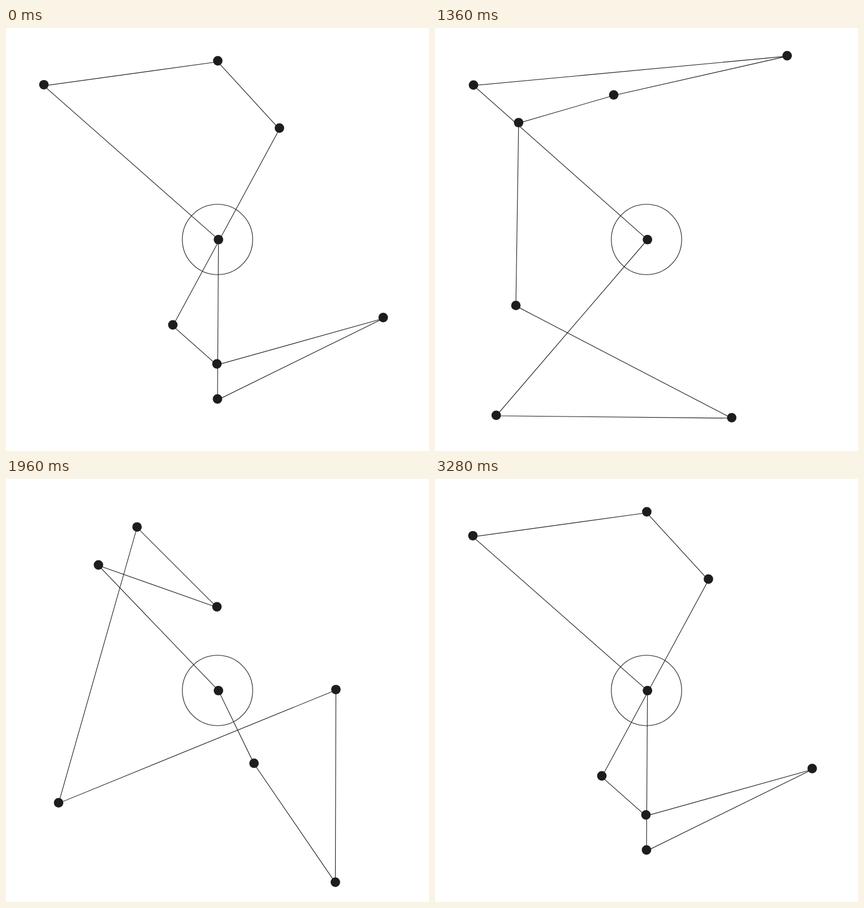
Animation, 748 px wide and 748 px high, one loop 3920 ms. Source, as an HTML page:

```html
<!DOCTYPE html>
<html lang="en">
<head>
<meta charset="utf-8">
<title>Linked nodes</title>
<style>
  html, body { margin: 0; width: 100%; height: 100%; overflow: hidden; background: #fff; }
  svg { display: block; width: 100%; height: 100%; }
  .wire { fill: none; stroke: #1c1c1c; stroke-width: 1.1; }
  .dot { fill: #1d1d1d; }
</style>
</head>
<body>
<svg viewBox="0 0 748 748">
  <circle class="wire" cx="374" cy="374" r="62.2"/>
  <polygon class="wire" id="path"/>
  <g id="dots"></g>
</svg>
<script>
  const TICK = 40, MOVE = 640, CYCLE = 1320, LOOP = 3920;
  const HUB = [375.7, 374.2];

  // The chain of nodes in its three resting poses; `drop` sets the wire below the dots.
  const POSES = [
    { drop: 1.8, nodes: '67,100.3 374.5,58 483.5,177 295,525 373,594 667,512 374,656' },
    { drop: 0.9, nodes: '67,100.3 625.5,47 317,118.7 148.5,162.7 138,492 524,688.8 104.5,687' },
    { drop: 0.9, nodes: '163.5,152 373,226 231.7,84.8 93,572.5 583.4,372.3 582.4,713 438.6,502.7' }
  ].map(({ drop, nodes }) => ({
    drop,
    nodes: nodes.split(' ').map(pair => pair.split(',').map(Number))
  }));

  const path = document.getElementById('path');
  const group = document.getElementById('dots');

  function place(dot, [x, y]) {
    dot.setAttribute('cx', x);
    dot.setAttribute('cy', y);
  }

  function addDot(point) {
    const dot = document.createElementNS('http://www.w3.org/2000/svg', 'circle');
    dot.setAttribute('class', 'dot');
    dot.setAttribute('r', 8.4);
    group.append(dot);
    place(dot, point);
    return dot;
  }

  addDot(HUB);
  const dots = POSES[0].nodes.map(addDot);

  const ease = p => p * p * (3 - 2 * p);
  const mix = (a, b, k) => a + (b - a) * k;

  function render(ms) {
    const t = Math.floor((ms % LOOP) / TICK) * TICK;
    const step = Math.floor(t / CYCLE);
    const k = ease(Math.min((t - step * CYCLE) / MOVE, 1));
    const from = POSES[step], to = POSES[(step + 1) % POSES.length];

    const drop = mix(from.drop, to.drop, k);
    const nodes = from.nodes.map((p, i) => p.map((v, j) => mix(v, to.nodes[i][j], k)));
    nodes.forEach((p, i) => place(dots[i], p));
    path.setAttribute('points', [HUB, ...nodes.map(([x, y]) => [x, y + drop])].join(' '));
  }

  const start = performance.now();
  function frame() {
    render(performance.now() - start);
    requestAnimationFrame(frame);
  }
  frame();
</script>
</body>
</html>
```
